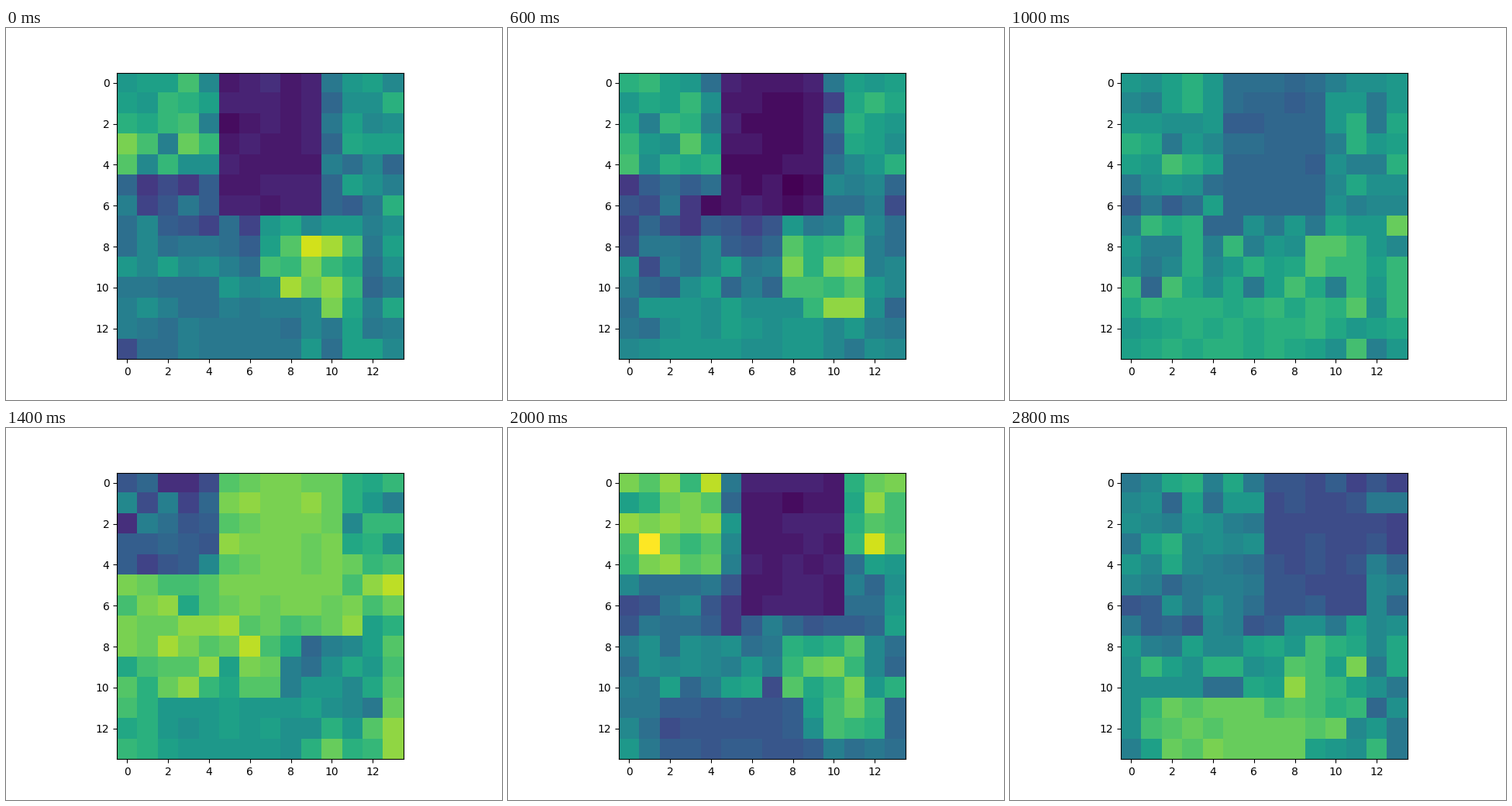
Recreate the animation shown at these times as a matplotlib script. Size 640 by 480 pixels, loop 3 s.

```python
import numpy as np
import matplotlib.pyplot as plt
from matplotlib.animation import FuncAnimation

SIZE = 14
FRAMES = 15
STEP_MS = 200

# Tones of the four independent areas at a few key moments.
KEYS = [0, 2, 4, 7, 10, 12, 14]
CORE = [8, 0, 10, 80, 8, 91, 24]
FLOOR = [40, 37, 67, 53, 28, 53, 76]
TOP_LEFT = [65, 52, 70, 30, 78, 78, 48]
TOP_RIGHT = [52, 65, 53, 58, 80, 40, 28]

rows, cols = np.mgrid[0:SIZE, 0:SIZE]


def box(row, col, half_h, half_w):
    """Mask of a rectangle with a slightly soft rim."""
    reach = np.maximum(np.abs(rows - row) / half_h, np.abs(cols - col) / half_w)
    return 1 / (1 + reach ** 14)


def paint(values, mask, tone):
    return values + mask * (tone - values)


def field(i):
    core, floor, top_left, top_right = (
        np.interp(i, KEYS, track) for track in (CORE, FLOOR, TOP_LEFT, TOP_RIGHT))
    t = i / (FRAMES - 1)

    # The core slides right while the lower patch sways and sinks.
    core_box = box(3, 7 + 2 * t ** 2, 3.7, 2.7)
    patch_box = box(9.3 + 0.8 * t, 9 + np.sin(np.pi * t), 2.3, 2)
    floor_box = box(12.2, 5, 1.5, 4)

    values = np.full((SIZE, SIZE), 40 + 0.4 * core)
    values = paint(values, box(6, 2, 1.7, 4.5), 22 + 0.7 * core)
    values = paint(values, box(2, 1.5, 2.6, 3), top_left)
    values = paint(values, box(1.5, 12, 2.3, 1.8), top_right)
    values = paint(values, core_box, core)
    values = paint(values, patch_box, 78 - 0.4 * core)
    values = paint(values, floor_box, floor)

    # Core and floor are calm, everything else is grainy.
    rough = 1.5 + 7 * (1 - core_box) * (1 - floor_box)
    grain = np.random.default_rng(40 + i).normal(size=(SIZE, SIZE))
    values = np.clip(values + rough * grain, 0, 100) / 100
    return np.round(values * 30) / 30


fig, ax = plt.subplots(figsize=(6.4, 4.8), dpi=100)
image = ax.imshow(field(0), cmap="viridis", vmin=0, vmax=1)


def update(i):
    image.set_data(field(i))
    return [image]


anim = FuncAnimation(fig, update, frames=FRAMES, interval=STEP_MS,
                     repeat=True, repeat_delay=0)
plt.show()
```
